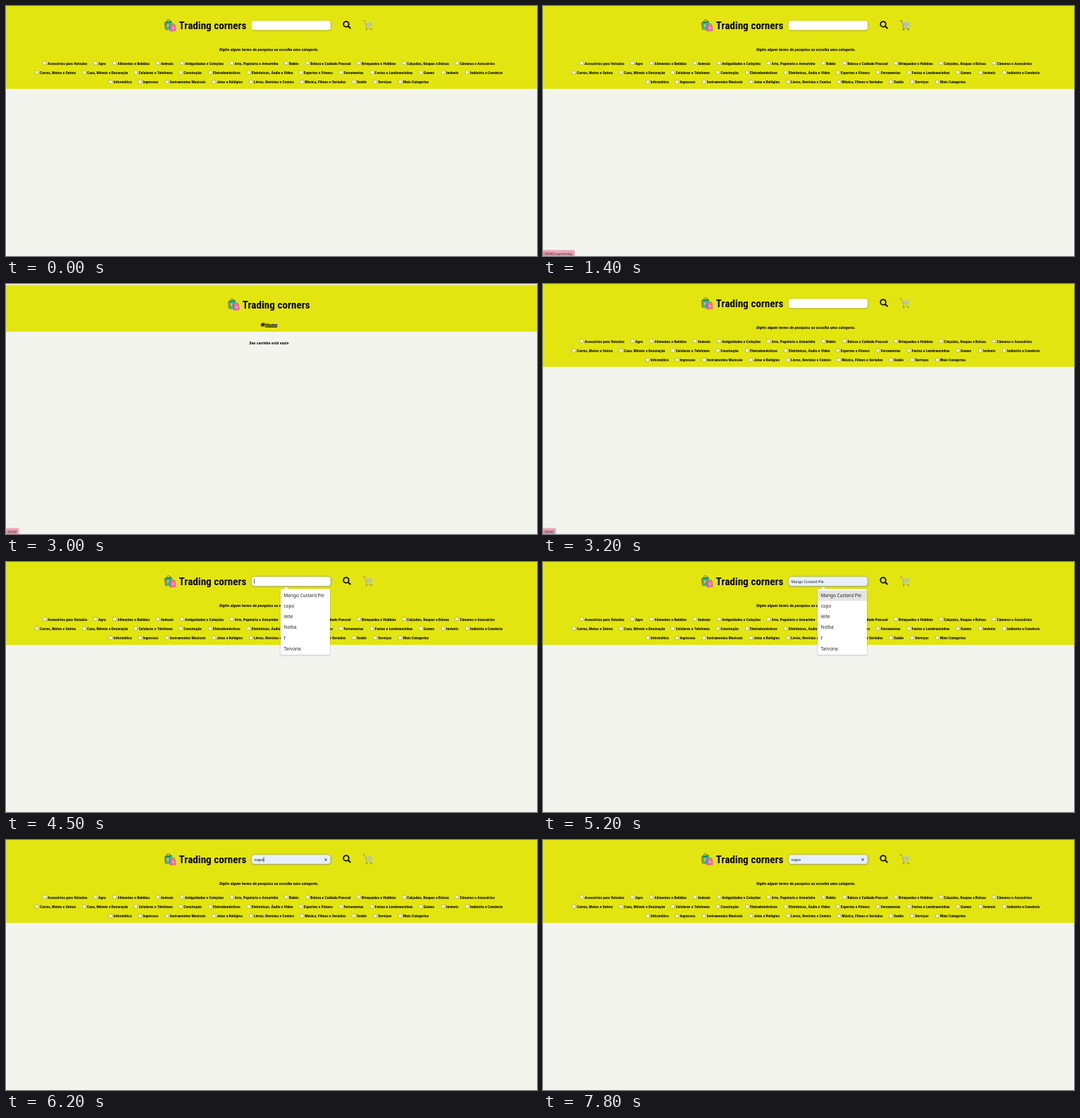
Write an HTML page with a canvas that moves like this. It is 754x356 px and loops after 8 s.

```html
<!DOCTYPE html>
<html lang="pt-BR">
<head>
<meta charset="utf-8">
<title>Loja</title>
<style>
  html, body { margin: 0; width: 100%; height: 100%; overflow: hidden; background: #f3f4ee; }
  canvas { display: block; width: 754px; height: 356px; }
</style>
</head>
<body>
<canvas id="stage" width="754" height="356"></canvas>
<script>
const ctx = document.getElementById('stage').getContext('2d');
const W = 754, H = 356, LOOP = 8000;
const YELLOW = '#e3e510', PAGE = '#f3f4ee', INK = '#080808';
const HEAD = '"Roboto Condensed", Roboto, sans-serif';
const MENU = '"Noto Sans", "Open Sans", sans-serif';
const FIELD = '"Liberation Sans", Arial, sans-serif';

const STORE = 'Trading corners';
const HINT = 'Digite algum termo de pesquisa ou escolha uma categoria.';
const ITEMS = ['Mango Custard Pie', 'copo', 'leite', 'Nolba', 'f', 'Tarvona'];

// Page changes and pointer events, in ms
const TIME = {
  overCart: 1100, cartLink: 1300, toCart: 1500,
  overHome: 2800, homeLink: 3000, toHome: 3200,
  focus: 4400, overMenu: 5100, pick: 6000
};
const LINGER = 300; // a link address stays this long after its page opens

// Each category: left edge of its label, then the label
const CATEGORIES = [
  [[59, 'Acessórios para Veículos'], [131, 'Agro'], [158.3, 'Alimentos e Bebidas'],
   [219.7, 'Animais'], [254, 'Antiguidades e Coleções'], [324.5, 'Arte, Papelaria e Armarinho'],
   [402, 'Bebês'], [432.3, 'Beleza e Cuidado Pessoal'], [505, 'Brinquedos e Hobbies'],
   [569.3, 'Calçados, Roupas e Bolsas'], [644.5, 'Câmeras e Acessórios']],
  [[48, 'Carros, Motos e Outros'], [115, 'Casa, Móveis e Decoração'], [188.4, 'Celulares e Telefones'],
   [252.3, 'Construção'], [294, 'Eletrodomésticos'], [348.8, 'Eletrônicos, Áudio e Vídeo'],
   [422.8, 'Esportes e Fitness'], [479.7, 'Ferramentas'], [523.8, 'Festas e Lembrancinhas'],
   [593, 'Games'], [625, 'Imóveis'], [659, 'Indústria e Comércio']],
  [[152.8, 'Informática'], [194.5, 'Ingressos'], [232.8, 'Instrumentos Musicais'],
   [299.3, 'Joias e Relógios'], [352, 'Livros, Revistas e Comics'], [424.2, 'Música, Filmes e Seriados'],
   [498, 'Saúde'], [528.3, 'Serviços'], [564, 'Mais Categorias']]
];

// All heading sizes follow from the size of the hint line
ctx.font = 'italic 700 100px ' + HEAD;
const BASE = 141 / (ctx.measureText(HINT).width / 100);
const SIZE = { hint: BASE, label: BASE * 0.9, home: BASE * 1.2, title: BASE * 2.45 };

function text(str, x, y, size, family, style = '', color = INK) {
  ctx.save();
  ctx.translate(x, y);
  ctx.scale(0.1, 0.1);
  ctx.font = `${style} ${size * 10}px ${family}`;
  ctx.fillStyle = color;
  ctx.fillText(str, 0, 0);
  ctx.restore();
}

function rect(x, y, w, h, color) {
  ctx.fillStyle = color;
  ctx.fillRect(x, y, w, h);
}

function box(x, y, w, h, r, fill, stroke, width = 0.5) {
  ctx.beginPath();
  ctx.roundRect(x, y, w, h, r);
  ctx.fillStyle = fill;
  ctx.fill();
  if (stroke) {
    ctx.shadowColor = 'transparent';
    ctx.strokeStyle = stroke;
    ctx.lineWidth = width;
    ctx.stroke();
  }
}

function shadow(color, blur, dx, dy) {
  ctx.shadowColor = color;
  ctx.shadowBlur = blur;
  ctx.shadowOffsetX = dx;
  ctx.shadowOffsetY = dy;
}

function path(points, close) {
  ctx.beginPath();
  points.forEach(([x, y]) => ctx.lineTo(x, y));
  if (close) ctx.closePath();
}

function shape(points, color) {
  path(points, true);
  ctx.fillStyle = color;
  ctx.fill();
}

function line(points, color, width) {
  path(points, false);
  ctx.strokeStyle = color;
  ctx.lineWidth = width;
  ctx.stroke();
}

function ring(x, y, r, color, width, from = 0, to = Math.PI * 2) {
  ctx.beginPath();
  ctx.arc(x, y, r, from, to);
  ctx.strokeStyle = color;
  ctx.lineWidth = width;
  ctx.stroke();
}

function bags(x, y) {
  ctx.save();
  ctx.translate(x, y);
  ring(6.5, 3.6, 2.5, '#6b5a32', 0.9, Math.PI, 0);
  shape([[0.5, 5.5], [3, 3.6], [3.4, 15.8], [1.5, 14.8]], '#a8703a');
  shape([[2.4, 4], [11, 3], [12.5, 15], [3.4, 16]], '#2fbd98');
  shape([[2.4, 4], [11, 3], [11.2, 5], [2.6, 6]], '#13866e');
  shape([[4.5, 8], [7, 7.4], [6.6, 11], [4.8, 11.5]], '#e6c64a');
  ring(12.6, 9, 2.3, '#8d3a66', 0.8, Math.PI, 0);
  shape([[7.6, 9], [9, 8.4], [9.6, 18], [8.4, 16.8]], '#b8437e');
  shape([[8.8, 8.6], [16.3, 8], [17.4, 17], [9.6, 18]], '#ee6aa6');
  shape([[11.4, 11.5], [14.4, 11.2], [14.8, 14.2], [11.9, 14.5]], '#f7a3c7');
  ctx.restore();
}

function cart(alpha) {
  ctx.save();
  ctx.globalAlpha = alpha;
  ctx.translate(514, 26.9);
  shape([[-3.8, -4.2], [6.8, -3.6], [5.2, 2.8], [-2.4, 3]], '#c3d0cd');
  for (let i = 0; i < 4; i++) {
    const x = -1.6 + i * 2.2;
    line([[x, -3.9], [x * 0.8, 2.9]], '#8ba09d', 0.4);
  }
  line([[-3.4, -1.8], [6.3, -1.4]], '#8ba09d', 0.4);
  line([[-2.9, 0.6], [5.7, 0.8]], '#8ba09d', 0.4);
  line([[-6.8, -6], [-4.5, -5.6], [-2.2, 3.6], [-2.8, 5], [5.6, 5]], '#6f878b', 0.8);
  line([[-7, -6.1], [-4.8, -5.7]], '#b7544a', 1.1);
  for (const x of [-2, 4.8]) {
    ctx.beginPath();
    ctx.arc(x, 6.5, 1, 0, Math.PI * 2);
    ctx.fillStyle = '#4b5c60';
    ctx.fill();
  }
  ctx.restore();
}

function lens() {
  ring(483, 25.9, 3.8, INK, 1.8);
  ctx.lineCap = 'round';
  line([[486, 28.9], [488.7, 31.6]], INK, 2.1);
  ctx.lineCap = 'butt';
}

function house(x, y) {
  line([[x, y + 3.6], [x + 3.4, y + 0.6], [x + 6.8, y + 3.6]], INK, 1);
  shape([[x + 1.1, y + 3.7], [x + 3.4, y + 1.7], [x + 5.7, y + 3.7], [x + 5.7, y + 6.2],
    [x + 4.1, y + 6.2], [x + 4.1, y + 4.4], [x + 2.7, y + 4.4], [x + 2.7, y + 6.2], [x + 1.1, y + 6.2]], INK);
  rect(x + 5, y + 0.7, 0.9, 1.6, INK);
}

function field(t, hover) {
  const focus = t >= TIME.focus;
  const chosen = t >= TIME.pick;
  const tinted = chosen || hover >= 0;
  ctx.save();
  if (focus) shadow('rgba(60,70,90,.6)', 2.2, 0.3, 0.5);
  else shadow('rgba(70,70,40,.45)', 2, 0.4, 0.6);
  box(348.8, 20.9, 112.2, 13.4, 3.6, tinted ? '#e8f0fe' : '#ffffff', focus ? '#a3a8ac' : '');
  ctx.restore();

  if (chosen) {
    text('copo', 352.4, 29.9, 6.2, FIELD);
    line([[452.4, 26.2], [455.8, 29.8]], '#2e3644', 0.9);
    line([[455.8, 26.2], [452.4, 29.8]], '#2e3644', 0.9);
  } else if (hover >= 0) {
    text(ITEMS[hover], 352.4, 29.9, 5.4, FIELD, '', '#222');
  }

  const blink = (focus && t < 4800) || (chosen && t < 6700) || (t >= 7200 && t < 7800);
  if (blink) rect(chosen ? 365.7 : 352.4, 24.3, 0.7, 6.8, '#111');
}

function menu(alpha, hover) {
  ctx.save();
  ctx.globalAlpha = alpha;
  ctx.save();
  shadow('rgba(0,0,0,.3)', 2, 0, 0.6);
  box(389.8, 38.6, 70.2, 93.6, 1.6, '#ffffff');
  ctx.restore();
  shape([[394.6, 39.1], [398, 35.2], [401.4, 39.1]], '#ffffff');
  ITEMS.forEach((name, i) => {
    const top = 40.4 + i * 15.06;
    if (i === hover) rect(389.8, top, 70.2, 15.06, '#e4e4e4');
    text(name, 394.5, top + 9.9, 6.45, MENU, '', '#222');
  });
  ctx.restore();
}

// The pointer goes down to the third row, then back to the second
function hovered(t) {
  if (t < TIME.overMenu || t >= TIME.pick) return -1;
  if (t < 5300) return 0;
  return t >= 5600 && t < 5800 ? 2 : 1;
}

function menuAlpha(t) {
  if (t < TIME.focus || t >= TIME.pick + 100) return 0;
  return t < TIME.focus + 100 || t >= TIME.pick ? 0.5 : 1;
}

function shop(t) {
  rect(0, 0, W, 118, YELLOW);
  bags(224.2, 18.5);
  text(STORE, 245.6, 32.9, SIZE.title, HEAD, '700');
  lens();
  cart(t >= TIME.overCart && t < TIME.toCart ? 1 : 0.65);
  text(HINT, 302.9, 64.2, SIZE.hint, HEAD, 'italic 700');
  CATEGORIES.forEach((row, i) => {
    const y = 83.6 + i * 13.35;
    for (const [x, name] of row) {
      box(x - 6.5, y - 4.6, 4.6, 4.6, 0.8, '#ffffff', '#7d7d6c');
      text(name, x, y, SIZE.label, HEAD, '700');
    }
  });
  const hover = hovered(t);
  field(t, hover);
  const alpha = menuAlpha(t);
  if (alpha) menu(alpha, hover);
}

function emptyCart(t) {
  rect(0, 1.5, W, 66.5, YELLOW);
  bags(314.5, 20);
  text(STORE, 335.8, 34.5, SIZE.title, HEAD, '700');
  house(361.4, 54.6);
  text('Home', 368.2, 60.6, SIZE.home, HEAD, '700');
  if (t >= TIME.overHome) rect(368.2, 61.2, 16.8, 0.7, INK);
  text('Seu carrinho está vazio', 345.2, 85.6, SIZE.hint, HEAD, 'italic 700');
}

function status(t, label, width, from, opened) {
  const fade = opened + LINGER;
  if (t < from || t >= fade + 100) return;
  ctx.save();
  ctx.globalAlpha = t < fade ? 1 : 0.5;
  box(-3, 347.4, width + 3, 12, 1.6, '#efa3b8');
  text(label, -0.2, 354.5, 6.1, MENU, '', '#2c2226');
  ctx.restore();
}

function draw(t) {
  rect(0, 0, W, H, PAGE);
  if (t >= TIME.toCart && t < TIME.toHome) emptyCart(t);
  else shop(t);
  status(t, ':3000/carrinho', 45, TIME.cartLink, TIME.toCart);
  status(t, ':3000', 18.3, TIME.homeLink, TIME.toHome);
}

const start = performance.now();
function tick() {
  draw((performance.now() - start) % LOOP);
  requestAnimationFrame(tick);
}
tick();
</script>
</body>
</html>
```
